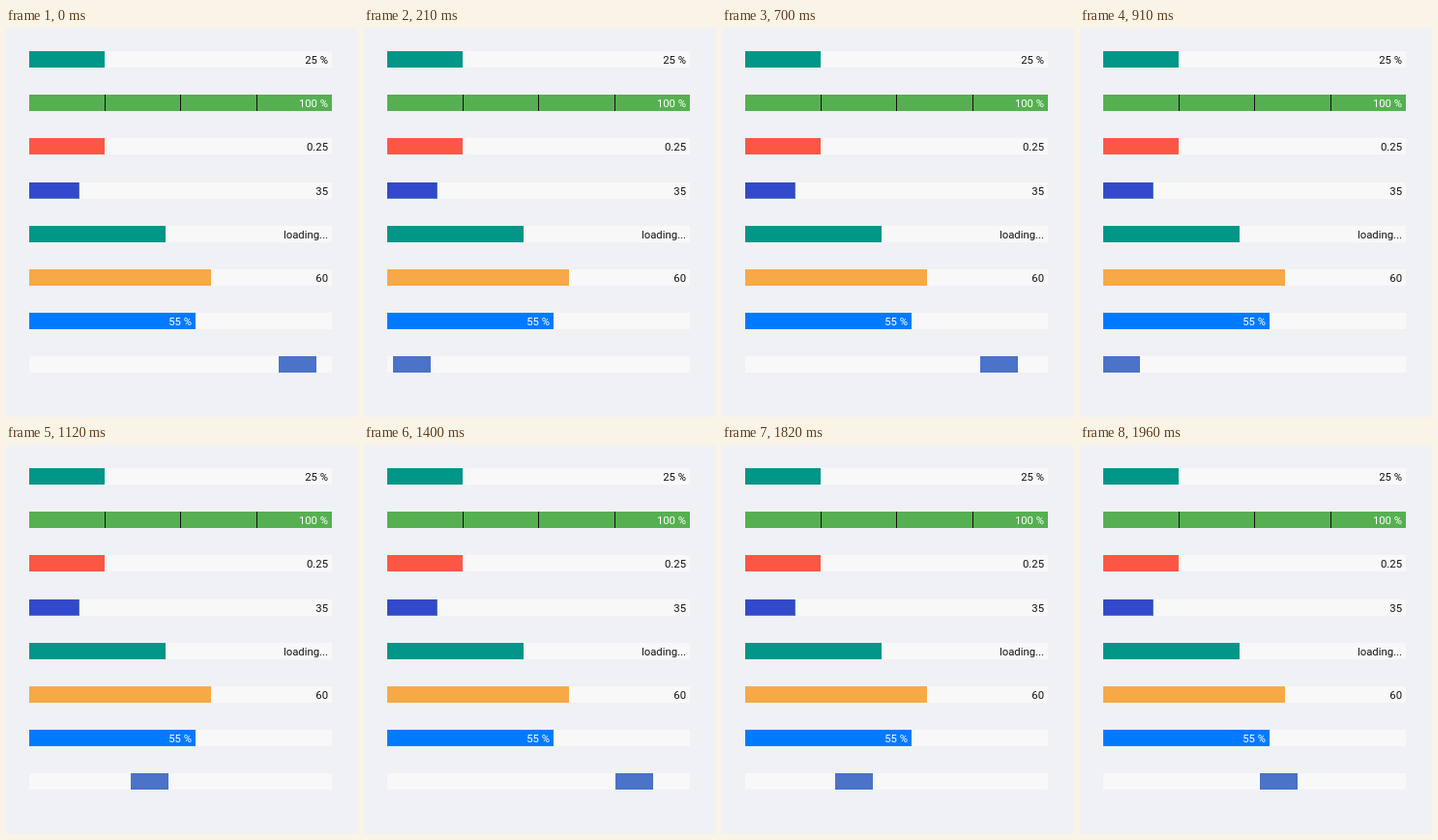
These frames come from a looping animation (364x403 px, 2030 ms). An HTML page:

```html
<!DOCTYPE html>
<html lang="en">
<head>
<meta charset="utf-8">
<title>Progress bars</title>
<style>
  html, body { margin: 0; width: 100%; height: 100%; overflow: hidden; background: #eff1f5; }
  body { position: relative; font: 11.3px/19px Roboto, Arial, sans-serif; color: #111; }
  .track { position: absolute; left: 24px; width: 313px; height: 17px; background: #f8f8f8; overflow: hidden; }
  .fill, .tick, .label, .runner { position: absolute; top: 0; height: 17px; }
  .fill { left: 0; }
  .tick { width: 1px; background: #111; }
  .label { right: 4px; white-space: pre; }
  .light { color: #fff; }
  .edged { box-shadow: inset -1px -1px #4a7fae; }
  .runner { left: 0; width: 39px; background: #4a73c9; }
</style>
</head>
<body>
<script>
  const bars = [
    { part: 0.25, color: '#009688', text: '25 %' },
    { part: 1, color: '#56b051', text: '100 %', light: true, ticks: [78, 156, 235] },
    { part: 0.25, color: '#fc5745', text: '0.25' },
    { part: 1 / 6, color: '#3349cb', text: '35', edged: true },
    { part: 0.45, color: '#009688', text: 'loading...' },
    { part: 0.6, color: '#f6a946', text: '60' },
    { part: 0.55, color: '#007bff', text: '55 %', light: true, inside: true },
    { runner: true }
  ];

  function add(parent, name, text = '') {
    const el = document.createElement('div');
    el.className = name;
    el.textContent = text;
    return parent.appendChild(el);
  }

  let runner;
  bars.forEach((bar, i) => {
    const track = add(document.body, 'track');
    track.style.top = Math.round(24 + 45.17 * i) + 'px';
    if (bar.runner) {
      runner = add(track, 'runner');
      return;
    }
    const fill = add(track, bar.edged ? 'fill edged' : 'fill');
    fill.style.width = Math.round(313 * bar.part) + 'px';
    fill.style.background = bar.color;
    for (const x of bar.ticks || []) add(track, 'tick').style.left = x + 'px';
    add(bar.inside ? fill : track, bar.light ? 'label light' : 'label', bar.text);
  });

  const STEP = 70, COUNT = 29, WIDTH = 39, LAP = 352;
  // [step, distance travelled]; the runner re-enters on the left after each lap
  const path = [[0, 258], [6, 457], [10, 595], [11, 617], [12, 667], [16, 809],
                [20, 940], [23, 1029], [24, 1079], [28, 1218]];

  function distance(step) {
    const i = Math.max(1, path.findIndex(p => p[0] >= step));
    const [s0, d0] = path[i - 1], [s1, d1] = path[i];
    return d0 + (d1 - d0) * (step - s0) / (s1 - s0);
  }

  const start = performance.now();
  function draw(now) {
    const step = Math.floor(Math.max(0, now - start) / STEP) % COUNT;
    const x = Math.round((distance(step) + WIDTH) % LAP) - WIDTH;
    runner.style.transform = `translateX(${x}px)`;
    requestAnimationFrame(draw);
  }
  draw(start);
</script>
</body>
</html>
```
